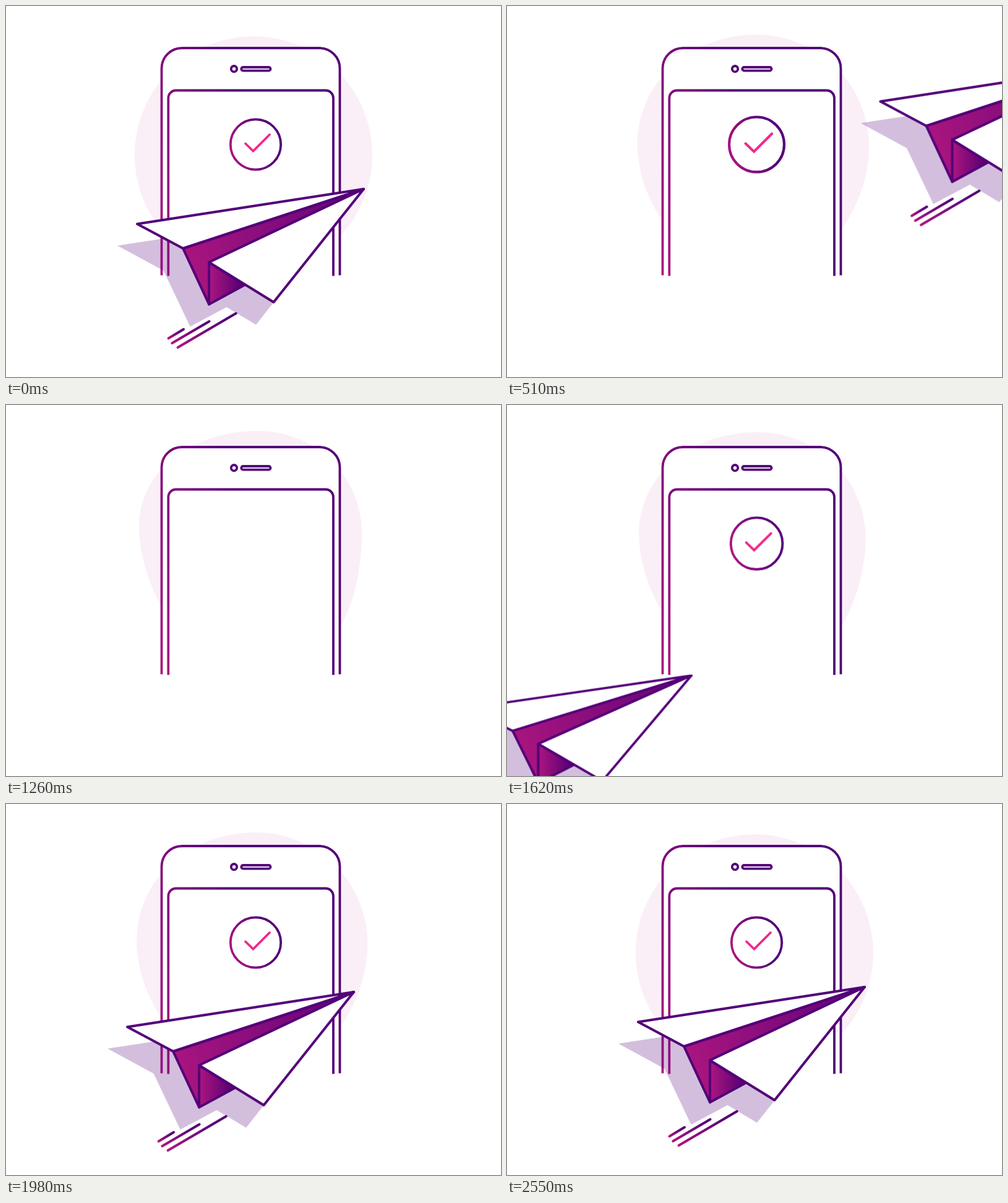
Write an HTML page that moves like this. It is 800x600 px and loops after 2580 ms.

```html
<!DOCTYPE html>
<html lang="en">
<head>
<meta charset="utf-8">
<title>Paper plane</title>
<style>
  html, body { margin: 0; width: 100%; height: 100%; overflow: hidden; background: #fff; }
  svg { display: block; width: 100%; height: 100%; }

  .blob, .badge, .plane { animation: 2580ms linear infinite; }

  .blob { fill: #faeff7; animation-name: morph; }
  .badge { transform-origin: 403.5px 224px; animation-name: pop; }
  .plane { transform-origin: 578px 296px; animation-name: fly; }

  .line { fill: none; stroke-width: 3.8; }
  .ink { stroke: #530078; stroke-width: 4; stroke-linejoin: round; }
  .trail { stroke: url(#trail); stroke-width: 4; stroke-linecap: round; }

  @keyframes morph {
    0%, 98.837%, 100% {
      d: path("M400 49 C506 49 592 135 592 241 C592 347 506 433 400 433 C294 433 208 347 208 241 C208 135 294 49 400 49 Z");
    }
    49.419% {
      d: path("M407 42 C500 42 575 115 575 208 C575 250 566 410 440 435 C270 435 215 275 215 195 C215 110 295 42 407 42 Z");
    }
  }

  @keyframes pop {
    0%, 15.116% { transform: scale(1); animation-timing-function: ease-in-out; }
    20.93% { transform: scale(1.1); animation-timing-function: ease-in; }
    27.132%, 52.326% { transform: scale(0); animation-timing-function: ease-out; }
    59.884% { transform: scale(1.1); animation-timing-function: ease-in-out; }
    64.535%, 100% { transform: scale(1); }
  }

  /* slow drift, dash out to the right, return from the left */
  @keyframes fly {
    0%, 98.837%, 100% { transform: translate(0, 0) scale(1, 1); }
    11.628% {
      transform: translate(8.5px, -4.2px) scale(1, 1);
      animation-timing-function: cubic-bezier(.17, 0, .83, 1);
    }
    27.132% {
      transform: translate(727px, -368px) scale(1, 1);
      animation-timing-function: step-end;
    }
    53.488% {
      transform: translate(-742px, 375px) scale(.97, .81);
      animation-timing-function: cubic-bezier(.17, 0, .83, 1);
    }
    68.605% { transform: translate(-21.8px, 11px) scale(1, 1); }
  }
</style>
</head>
<body>
<svg viewBox="0 0 800 600">
  <defs>
    <linearGradient id="frame" gradientUnits="userSpaceOnUse" x1="240" y1="420" x2="440" y2="360">
      <stop stop-color="#b0147f"/><stop offset="1" stop-color="#530078"/>
    </linearGradient>
    <linearGradient id="ring" x1="0" y1=".6" x2=".7" y2=".4">
      <stop stop-color="#a8147f"/><stop offset="1" stop-color="#530078"/>
    </linearGradient>
    <linearGradient id="body" gradientUnits="userSpaceOnUse" x1="290" y1="400" x2="560" y2="310">
      <stop stop-color="#a9157f"/><stop offset="1" stop-color="#640579"/>
    </linearGradient>
    <linearGradient id="keel" gradientUnits="userSpaceOnUse" x1="330" y1="0" x2="382" y2="0">
      <stop stop-color="#a9157f"/><stop offset="1" stop-color="#560073"/>
    </linearGradient>
    <linearGradient id="trail" x2=".8" y1="1" y2=".2">
      <stop stop-color="#b0147f"/><stop offset="1" stop-color="#530078"/>
    </linearGradient>
  </defs>

  <path class="blob" d="M400 49C506 49 592 135 592 241C592 347 506 433 400 433C294 433 208 347 208 241C208 135 294 49 400 49Z"/>

  <g class="line" stroke="url(#frame)">
    <path fill="#fff" d="M251.5 435.5V101a33 33 0 0 1 33-33H506.500a33 33 0 0 1 33 33V435.500"/>
    <path d="M262.300 436.500V149a12.500 12.500 0 0 1 12.500-12.500H516.500a12.500 12.500 0 0 1 12.500 12.500V436.500"/>
  </g>
  <g class="line" stroke="#530078">
    <circle cx="368.5" cy="101.700" r="4.700"/>
    <rect x="380.300" y="99" width="47.200" height="5.600" rx="2.800"/>
  </g>

  <g class="badge">
    <circle class="line" cx="403.5" cy="224" r="40.700" stroke="url(#ring)"/>
    <path class="line" d="M387 222.500L399.500 234.500L426 208" stroke="#f0288c" stroke-linecap="round"/>
  </g>

  <g class="plane">
    <path fill="#4f0078" stroke="none" opacity=".25" d="M180 387.500L549 331L404 515.500L356.500 487L297.500 518.500L254.500 428Z"/>
    <path class="trail" d="M262.500 537.500L287 522.800"/>
    <path class="trail" d="M268.300 545.300L328.500 510"/>
    <path class="trail" d="M277.500 552.300L371.700 497"/>
    <g class="ink">
      <path fill="url(#body)" d="M286 392L578 296L328 414.500V482.500Z"/>
      <path fill="url(#keel)" d="M328 414.500L386 451L328 482.500Z"/>
      <path fill="#fff" d="M212 352.500L578 296L286 392Z"/>
      <path fill="#fff" d="M328 414.500L578 296L432.500 479Z"/>
    </g>
  </g>
</svg>
</body>
</html>
```
